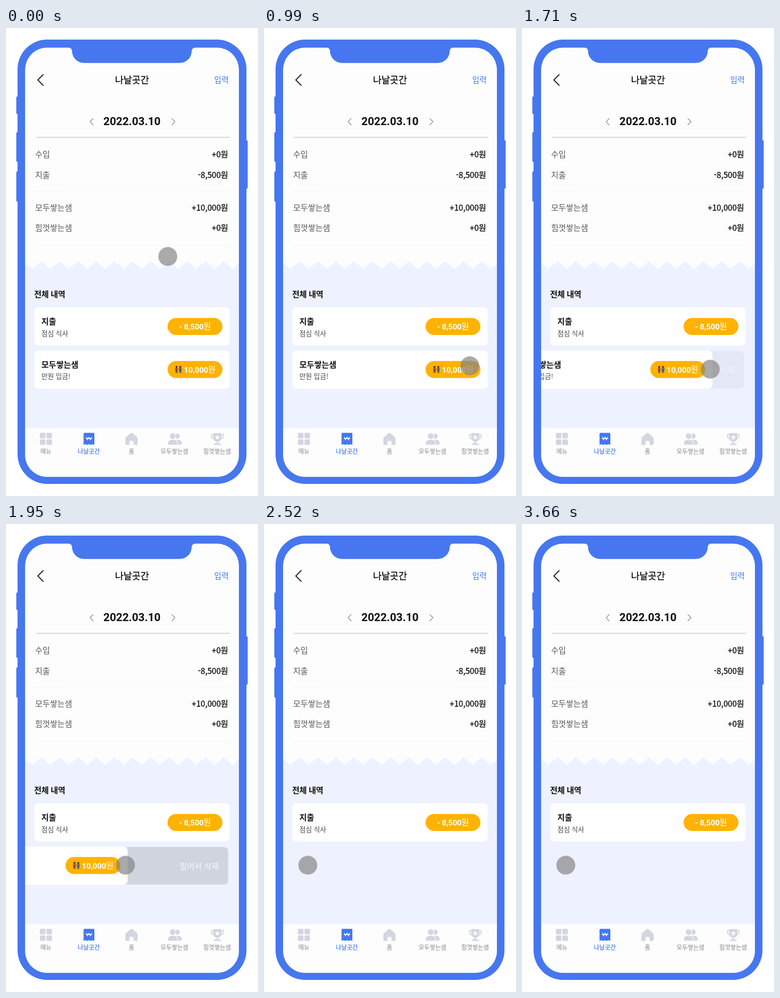
These frames come from a looping animation (502x930 px, 4200 ms). An HTML page:

```html
<!DOCTYPE html>
<html lang="ko">
<head>
<meta charset="utf-8">
<title>Swipe to delete</title>
<style>
html, body { margin: 0; width: 100%; height: 100%; overflow: hidden; background: #fff; }
svg { display: block; width: 502px; height: 930px; }
text { font: 400 16px "Noto Sans CJK KR", "Noto Sans KR", sans-serif; fill: #111; }
.label { fill: #55565a; }
.medium { stroke: #111; stroke-width: .35px; }
.value { text-anchor: end; }
.title { font-weight: 700; }
.sub { font-size: 13.5px; fill: #444; }
.num { font: 700 15.5px Roboto, sans-serif; fill: #fff; }
.won { font-size: 16.5px; fill: #fff; }
.tab { font-size: 12px; fill: #85868d; text-anchor: middle; }
.active { fill: #4677f0; stroke: #4677f0; stroke-width: .25px; }
.icon { fill: #d2d6df; }

.drag, .toX, .toY, .bar, .row { animation: 4200ms infinite linear both; }
.drag { animation-name: drag; }
.toX { animation-name: toX; }
.toY { animation-name: toY; }
.bar { animation-name: reveal; }
.row { animation-name: remove; }
@keyframes toX {
  0%, 3.81% { transform: translateX(0); animation-timing-function: ease-in-out; }
  34.5%, 100% { transform: translateX(119px); }
}
@keyframes toY {
  0%, 5.86% { transform: translateY(0); animation-timing-function: ease-in-out; }
  26.1%, 100% { transform: translateY(224px); }
}
@keyframes drag {
  0%, 33.7% { transform: translateX(0); animation-timing-function: ease-in-out; }
  57.17%, 100% { transform: translateX(-354px); }
}
@keyframes reveal {
  0%, 33.7% { opacity: 0; animation-timing-function: ease-in-out; }
  57.17%, 100% { opacity: 1; }
}
@keyframes remove {
  0%, 57.17% { opacity: 1; }
  59.3%, 100% { opacity: 0; }
}
</style>
</head>
<body>
<svg viewBox="0 0 502 930">
  <defs>
    <clipPath id="screen"><rect x="38" y="39" width="426" height="853" rx="44"/></clipPath>
    <g id="person">
      <circle cx="2.7" cy="2" r="1.9" fill="#3d2c28"/>
      <path d="M0 4.200h5.400v4.300h-5.400z"/>
      <path d="M.8 8.500h3.800v5.500h-1.400v-3.500h-1v3.500H.8z" fill="#34466e"/>
    </g>
  </defs>

  <!-- phone body -->
  <g fill="#4677f0">
    <rect x="20.5" y="136" width="6" height="35" rx="2"/>
    <rect x="20.5" y="207" width="6" height="59" rx="2"/>
    <rect x="20.5" y="285" width="6" height="60" rx="2"/>
    <rect x="475" y="223" width="6.5" height="96" rx="2"/>
    <rect x="23" y="23" width="456" height="883" rx="59"/>
  </g>

  <g clip-path="url(#screen)">
    <rect x="38" y="39" width="426" height="853" fill="#fdfdfd"/>
    <path id="paper" fill="#eef2ff"/>
    <rect x="38" y="795" width="426" height="98" fill="#fdfdfd"/>

    <!-- header -->
    <path d="M74.500 92 63.500 103.300 74.500 114.600" fill="none" stroke="#2b2b2e" stroke-width="2.2"/>
    <text class="medium" x="251" y="109.8" text-anchor="middle" style="font-size:18.4px">나날곳간</text>
    <text x="443.5" y="109.3" text-anchor="end" style="font-size:15.6px;fill:#4677f0">입력</text>
    <g fill="none" stroke="#8f9094" stroke-width="1.4">
      <path d="M174 179.5 167.5 186.3 174 193"/>
      <path d="M330 179.5 336.5 186.3 330 193"/>
    </g>
    <text x="251" y="193" text-anchor="middle" style="font:700 22px Roboto,sans-serif">2022.03.10</text>

    <!-- summary -->
    <path d="M59.5 217.3H446" stroke="#cbcbcd" stroke-width="1.6"/>
    <path d="M59.5 325.5H446M59.5 433.5H446" stroke="#f0f0f2" stroke-dasharray="5 3"/>
    <text class="label" x="58" y="257">수입</text>
    <text class="value medium" x="442.5" y="257">+0원</text>
    <text class="label" x="58" y="297.5">지출</text>
    <text class="value medium" x="442.5" y="297.5">-8,500원</text>
    <text class="label" x="58" y="362.5">모두쌓는샘</text>
    <text class="value medium" x="442.5" y="362.5">+10,000원</text>
    <text class="label" x="58" y="403">힘껏쌓는샘</text>
    <text class="value medium" x="442.5" y="403">+0원</text>

    <!-- list -->
    <text class="title" x="56" y="534.5" letter-spacing="-.3">전체 내역</text>
    <rect x="56.5" y="555" width="389" height="76" rx="8" fill="#fff"/>
    <text class="title" x="70.5" y="589">지출</text>
    <text class="sub" x="70.5" y="612">점심 식사</text>
    <rect x="321.8" y="576.2" width="109.4" height="33.800" rx="16.900" fill="#ffb300"/>
    <text class="num" x="344.5" y="599">- 8,500</text>
    <text class="won" x="393.3" y="599.3">원</text>

    <g class="row">
      <g class="bar">
        <rect x="57" y="642" width="385.5" height="74.5" rx="8" fill="#b7bec8"/>
        <text x="424" y="685.5" text-anchor="end" style="fill:#fff">밀어서 삭제</text>
      </g>
      <g class="drag">
        <rect x="56.5" y="641" width="389" height="76" rx="8" fill="#fff"/>
        <text class="title" x="70.5" y="674.5">모두쌓는샘</text>
        <text class="sub" x="70.5" y="697">만원 입금!</text>
        <rect x="321.8" y="661.700" width="109.4" height="33.800" rx="16.900" fill="#ffb300"/>
        <use href="#person" x="337" y="671.500" fill="#b8453b"/>
        <use href="#person" x="344.500" y="671.500" fill="#3c6a9c"/>
        <text class="num" x="354.5" y="684.5">10,000</text>
        <text class="won" x="402.3" y="684.8">원</text>
      </g>
    </g>

    <!-- tab bar -->
    <g class="icon">
      <rect x="67.5" y="804.5" width="11" height="11" rx="2"/>
      <rect x="80.5" y="804.5" width="11" height="11" rx="2"/>
      <rect x="67.5" y="817.5" width="11" height="11" rx="2"/>
      <rect x="80.5" y="817.5" width="11" height="11" rx="2"/>
      <path d="M250 804.5q1.2 0 2 .8l8.6 7.4q1.6 1.4 1.6 3.4v10.4q0 2-2 2h-6v-6q0-2-2-2h-4.4q-2 0-2 2v6h-6q-2 0-2-2v-10.4q0-2 1.6-3.4l8.6-7.4q.8-.8 2-.8z"/>
      <circle cx="341" cy="811" r="5"/>
      <path d="M335 828q0-10 6-10 9 0 9 8 0 2-2 2z"/>
      <g stroke="#fdfdfd" stroke-width="1.2">
        <circle cx="332" cy="811" r="6.3"/>
        <path d="M321.8 826q0-8.3 10.2-8.3t10.2 8.3q0 2.6-2.6 2.6h-15.2q-2.600 0-2.600-2.600z"/>
      </g>
      <path d="M413 805h16v8q0 9-8 9t-8-9zM419.5 821h3v4.5h-3zM414.5 825.5h13v3h-13z"/>
      <path d="M413.5 808.2h-4.300q0 7.800 6 8.800M428.5 808.2h4.300q0 7.800-6 8.800" fill="none" stroke="#d2d6df" stroke-width="2"/>
      <path d="M421 808.5l1.500 3 3.300.5-2.400 2.300.6 3.300-3-1.600-3 1.600.6-3.300-2.400-2.300 3.300-.5z" fill="#fdfdfd"/>
    </g>
    <path d="M156 804.500h18.500q1.500 0 1.500 1.500v22.500l-3.600-1.500-3.600 1.500-3.600-1.500-3.600 1.500-3.600-1.500-3.500 1.500v-22.500q0-1.500 1.500-1.500z" fill="#4677f0"/>
    <path d="M160 812.8l2.400 5.400 2.900-5 2.900 5 2.400-5.400M159 815.5h12.600" fill="none" stroke="#fff" stroke-width="1.3"/>
    <text class="tab" x="79.5" y="846">메뉴</text>
    <text class="tab active" x="165" y="846">나날곳간</text>
    <text class="tab" x="250" y="846">홈</text>
    <text class="tab" x="335.5" y="846">모두쌓는샘</text>
    <text class="tab" x="420.5" y="846">힘껏쌓는샘</text>
  </g>

  <!-- notch -->
  <path d="M125 38v1a6.500 6.500 0 0 1 6.500 6.500a24 24 0 0 0 24 24h190.500a24 24 0 0 0 24-24a6.500 6.500 0 0 1 6.500-6.500v-1z" fill="#4677f0"/>

  <!-- pointer -->
  <g class="drag"><g class="toX"><g class="toY">
    <circle cx="322.3" cy="454" r="18.8" fill="#808080" fill-opacity=".67"/>
  </g></g></g>
</svg>
<script>
// Torn paper edge: alternating points every half tooth.
let edge = "M38 795";
for (let i = 0; i < 25; i++) edge += `L${34.5 + i * 18.15} ${i % 2 ? 479 : 463.5}`;
document.getElementById("paper").setAttribute("d", edge + "V795Z");
</script>
</body>
</html>
```
